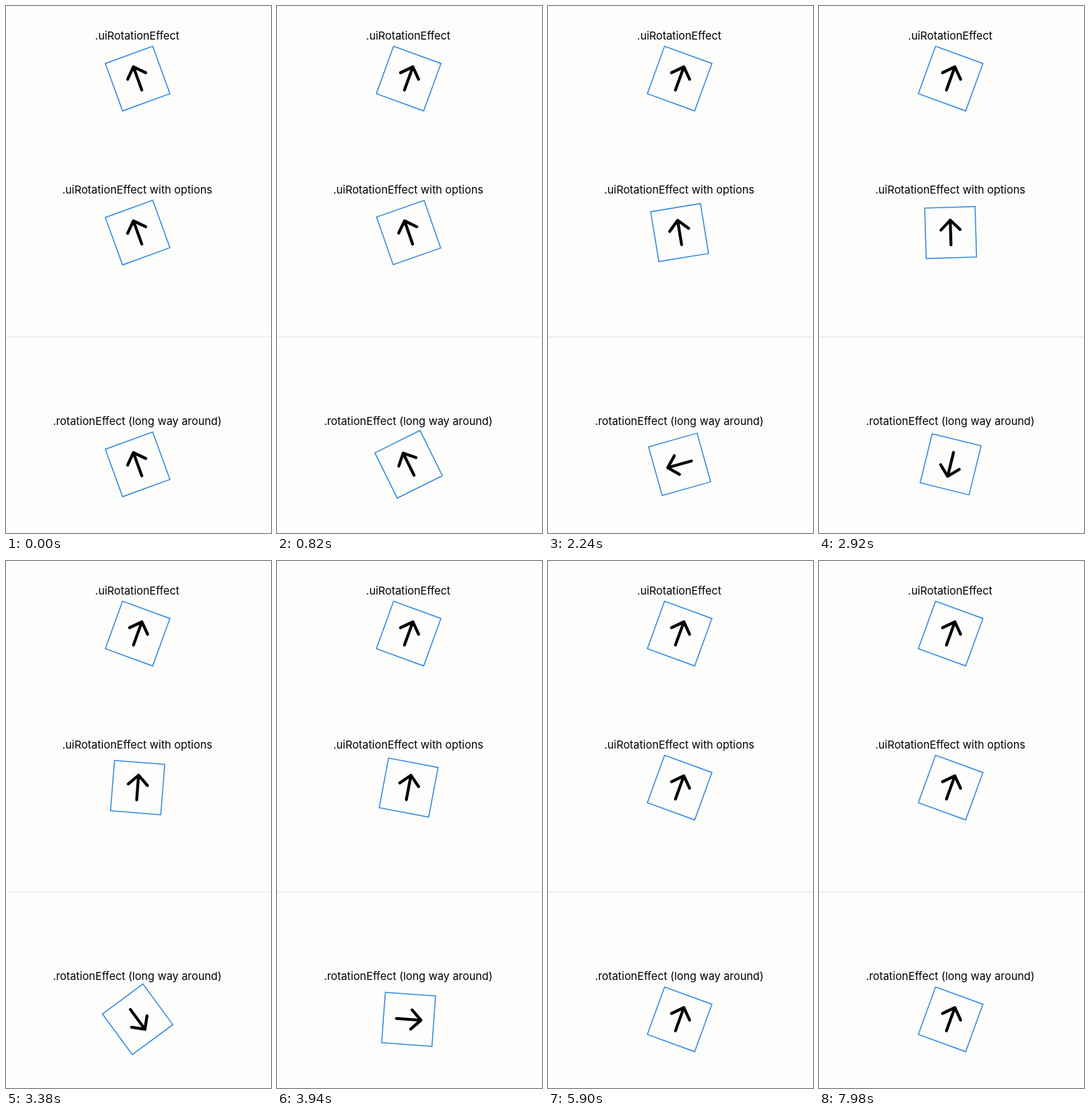
An HTML page for the animation above (8000 ms loop, 364x722 px).

```html
<!DOCTYPE html>
<html lang="en">
<head>
<meta charset="utf-8">
<title>Rotation effects</title>
<style>
  html, body { margin: 0; width: 100%; height: 100%; overflow: hidden; background: #fdfdfc; }
  svg { display: block; }
  text { font: 14.95px Inter, "Liberation Sans", sans-serif; text-anchor: middle; fill: #000; }
  rect { fill: none; stroke: #2f86dc; stroke-width: 1.4; }
  path { fill: none; stroke: #000; stroke-width: 4; stroke-linecap: round; stroke-linejoin: round; }
</style>
</head>
<body>
<svg width="364" height="722" viewBox="0 0 364 722">
  <defs>
    <g id="card">
      <rect x="-34.6" y="-34.6" width="69.2" height="69.2"/>
      <path d="M0 16.8V-16.8M-13.2 -3.8L0 -17L13.2 -3.8"/>
    </g>
  </defs>
  <line x2="364" y1="453.5" y2="453.5" stroke="#e6e6e2"/>
  <text x="180.3" y="46">.uiRotationEffect</text>
  <text x="180.3" y="257">.uiRotationEffect with options</text>
  <text x="180.3" y="574">.rotationEffect (long way around)</text>
  <use href="#card"/>
  <use href="#card"/>
  <use href="#card"/>
</svg>
<script>
  const LOOP = 8000;
  const START_STEP = 5;
  const START_ANGLE = -20;
  const cards = document.querySelectorAll("use");

  // Durations are counted in playback steps.
  const rotations = [
    { y: 99.4, turn: 40, duration: 10 },
    { y: 310.4, turn: 40, duration: 120 },
    { y: 627.9, turn: -320, duration: 120 },
  ];

  // Steps follow a 20, 100, 20 ms rhythm.
  function stepAt(time) {
    const rest = time % 140;
    return Math.floor(time / 140) * 3 + (rest >= 20) + (rest >= 120);
  }

  // cubic-bezier(0.42, 0, 0.58, 1)
  function easeInOut(x) {
    if (x <= 0) return 0;
    if (x >= 1) return 1;
    let low = 0, high = 1, s;
    for (let i = 0; i < 24; i++) {
      s = (low + high) / 2;
      const r = 1 - s;
      const bx = 3 * r * r * s * 0.42 + 3 * r * s * s * 0.58 + s ** 3;
      if (bx < x) low = s; else high = s;
    }
    return s * s * (3 - 2 * s);
  }

  function draw(now) {
    const step = stepAt(now % LOOP);
    rotations.forEach(({ y, turn, duration }, i) => {
      const angle = START_ANGLE + turn * easeInOut((step - START_STEP) / duration);
      cards[i].setAttribute("transform", `translate(180.8 ${y}) rotate(${angle})`);
    });
    requestAnimationFrame(draw);
  }
  draw(0);
</script>
</body>
</html>
```
